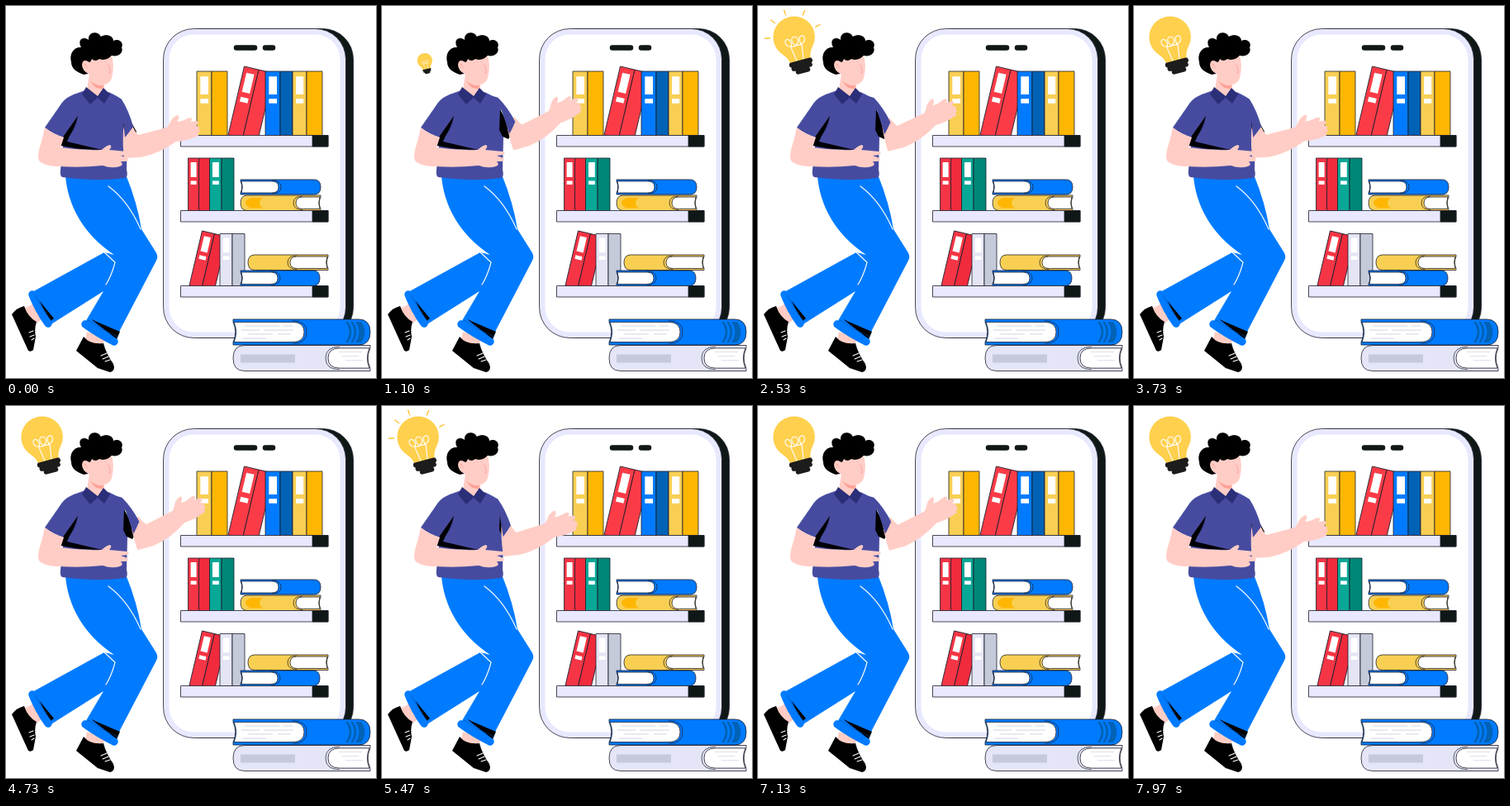
An HTML page for the animation above (8010 ms loop, 448 by 450 pixels).

```html
<!DOCTYPE html>
<html lang="en">
<head>
<meta charset="utf-8">
<title>Mobile library</title>
<style>
html, body { margin: 0; width: 100%; height: 100%; overflow: hidden; background: #fff; }
svg { display: block; width: 448px; height: 450px; }
.ink { stroke: #1d1d2b; stroke-width: .8; stroke-linejoin: round; }
.skin { fill: #ffcdc5; }
.blue { fill: #007bff; }
.shirt { fill: #464ba0; }
.line { fill: none; stroke: #fff; stroke-width: 1.1; stroke-linecap: round; }
</style>
</head>
<body>
<svg viewBox="0 0 448 450">
  <g id="phone">
    <rect class="ink" x="200" y="27.5" width="220.5" height="374" rx="37" fill="#101817"/>
    <rect class="ink" x="190.5" y="27.5" width="221" height="374" rx="37" fill="#e8e8ff"/>
    <rect x="197.5" y="34.5" width="207" height="360" rx="30" fill="#fff"/>
    <path d="M279 50.5H301M314 50.5H323" stroke="#101817" stroke-width="6.5" stroke-linecap="round"/>
  </g>
  <g id="shelves"></g>

  <g id="man">
    <path class="skin" d="M22 366L37 358 47 377 33 386ZM98 394L121 402 116 412 96 403Z"/>
    <path d="M7 373Q13 365 22 363Q26 376 37 382Q34 391 36 400L33 416Q30 419 27 417Z"/>
    <path d="M85 417L94 400Q102 410 118 408Q121 420 130 433Q133 441 126 443L111 438Z"/>
    <path class="line" d="M28 395L33 393M29 400L34 398M31 404L34 402M115 423L122 420M117 427L124 424M120 430L126 428"/>
    <path class="blue" d="M72 206C75 240 92 275 131 301L119 298 30 347 53 386 118 345 95 384 134 404 138 392 182 308Q185 303 181 297L164 270Q159 238 145 204Z"/>
    <path d="M36 358L40 356 58 378 51 383ZM103 379L138 394 134 403Z"/>
    <path d="M32 349Q39 367 51 384M96 385Q111 396 131 406" fill="none" stroke="#007bff" stroke-width="9.5" stroke-linecap="round"/>
    <path d="M36 350Q43 368 56 382M99 380Q114 391 135 400" fill="none" stroke="#0a4fae" stroke-width=".6"/>
    <path class="line" d="M124 218C139 229 153 247 163 270M118 297L132 310Q128 326 121 337"/>

    <path class="skin" d="M101 82L119 90 119 104 110 116 98 101Z"/>
    <path class="shirt" d="M96 102C82 107 72 109 65 121L47 147Q57 155 70 159L66 198Q65 205 68 207Q105 213 145 208Q148 205 146 198L147 160 144 128 140 113Q135 109 124 104L111 110Z"/>
    <path d="M87 133Q85 145 76 159L74 164 116 174 90 173 66 169 70 157Z"/>
    <path d="M143 125L158 152 153 161 146 158 142 150Z"/>
    <path d="M97 98L92 107 102 119 111 111 119 118 126 107 118 99 111 109Z" fill="#2b2f78"/>
    <path d="M102 90Q108 97 118 96L117 100Q107 101 102 90Z" fill="#ff9f96"/>

    <path d="M94 83C86 80 79 76 79 68C76 57 83 49 91 50C86 41 93 36 100 41C99 32 110 29 115 37C121 33 130 36 130 42C138 38 143 46 140 50C143 57 135 62 128 60L110 80Z"/>
    <path class="skin" d="M104 64Q108 68 113 64Q121 67 128 60Q131 70 129 82Q128 94 119 95Q108 94 101 83Q92 78 92 71Q93 63 101 68Q103 67 104 64Z"/>
    <path d="M123 71Q128 77 125 82M94 70Q97 70 98 75" fill="none" stroke="#ff9f96" stroke-width="1"/>

    <path id="arm" class="skin" d="M143 145L153 145Q156 152 160 156L195 147Q198 143 200 138Q204 133 208 132Q211 134 207 140L213 139 222 135Q228 136 223 140L231 139Q235 142 229 145Q237 146 233 149Q237 152 232 154Q235 157 230 158Q220 163 206 164Q185 179 163 183L143 184Q141 170 142 150Z"/>
    <path id="sleeve" class="shirt" d="M127 106L140 113Q149 127 154 146Q149 153 144 159L141 130Z"/>
    <path class="skin" d="M47 147Q57 155 70 159L66 171Q91 175 116 174Q121 169 126 168Q129 170 125 174L146 176Q151 178 147 180L139 181 147 184Q149 187 145 188L139 188Q143 192 138 194Q128 197 117 193Q88 196 65 194Q46 194 40 187Q37 180 43 164Z"/>
  </g>

  <g id="bulb">
    <path d="M0-71A25 25 0 0 1 19-29.5Q13-23 12.500-15H-12.500Q-13-23-19-29.500A25 25 0 0 1 0-71Z" fill="#ffd04e"/>
    <path class="line" d="M-4-16L-7-36C-14-38-13-47-8-45C-4-43-5-36-7-36Q0-34 0-36C-5-38-5-47 0-46C5-47 5-38 0-36Q5-34 7-36C5-36 4-43 8-45C13-47 14-38 7-36L4-16"/>
    <path d="M-11.500-14H11.500M-10-9H10M-6-4H6" stroke="#1c1c1c" stroke-width="6" stroke-linecap="round"/>
  </g>
  <g id="rays" stroke="#ffc234" stroke-width="1.4" stroke-linecap="round"></g>
</svg>
<script>
const $ = id => document.getElementById(id);
const rect = (x, y, w, h, fill) =>
  `<rect class="ink" x="${x}" y="${y}" width="${w}" height="${h}" fill="${fill}"/>`;

const shelf = y => rect(211.500, y, 178.500, 13.500, '#e8e8ff') + rect(371, y, 19, 13.500, '#101817');

// Standing book: spine with two labels, then the cover; lean tips it to the right.
function standing(x, base, h, a, b, spine, cover, lean = 0) {
  const w = a * .54, lx = a * .24;
  return `<g transform="translate(${x} ${base}) matrix(1 ${lean} ${-lean} 1 0 0)">` +
    rect(0, -h, a, h, spine) + rect(a, -h, b, h, cover) +
    `<path d="M${lx} ${h * -.92}h${w}v${h * .28}h${-w}zM${lx} ${h * -.57}h${w}v${h * .07}h${-w}z" fill="#fff"/></g>`;
}

// Lying book with its page edges on the left, or on the right when flipped.
function lying(x, y, w, h, pages, fill, flip, extra = '') {
  const r = h * .45, m = h * .11, e = pages - r;
  return `<g transform="translate(${flip ? x + w : x} ${y}) scale(${flip ? -1 : 1} 1)">
    <path class="ink" fill="${fill}" d="M0 0H${w - r}Q${w} 0 ${w} ${h / 2}T${w - r} ${h}H0V${h - m}Q${h * .18} ${h / 2} 0 ${m}Z"/>
    <path class="ink" fill="#fff" d="M1 ${m}H${e}Q${pages} ${m} ${pages} ${h / 2}T${e} ${h - m}H1Q${h * .2} ${h / 2} 1 ${m}Z"/>
    <path d="M${e} ${m / 2}Q${pages + 3} ${m / 2} ${pages + 3} ${h / 2}T${e} ${h - m / 2}" fill="none" stroke="#1d1d2b" stroke-width=".7"/>
    ${extra}</g>`;
}

const red = '#f53545', darkRed = '#f02b3c', coral = '#fb3c47', yellow = '#f9cf53', amber = '#ffb703',
      blue = '#007bff', navy = '#0062b5', pale = '#e3e5f5', grey = '#c5cadb';
const blob = `<path d="M85 3Q97 9 85 15.500H70Q78 9 70 3Z" fill="${amber}"/>`;
const arc = (x, w) => `M${x} 3Q${x + 9} 15 ${x} 28H${x + w}Q${x + w + 9} 15 ${x + w} 3Z`;
const pageLines = '<path d="M14 8H56M61 8H72M10 13H32M37 13H73M18 18H48M54 18H70M12 23H40" stroke="#c5cadb" stroke-width=".8"/>';

$('shelves').innerHTML =
  standing(231, 156.500, 77.500, 18, 19, yellow, amber) +
  standing(269, 156, 83, 17.500, 18, coral, coral, .235) +
  standing(314, 156.500, 77.500, 18, 15, blue, navy) +
  standing(347, 156.500, 77.500, 17, 19, yellow, amber) +
  shelf(156.500) +
  standing(220.500, 248, 64, 13, 13, red, darkRed) +
  standing(246.500, 248, 64, 14.500, 15, '#08a896', '#008777') +
  lying(284, 210, 97, 18, 46, blue) +
  lying(284, 229, 97, 18.500, 30, yellow, true, blob) +
  shelf(247.500) +
  standing(222, 338, 66, 15, 15, red, darkRed, .235) +
  standing(259, 338.500, 63, 15, 15, pale, grey) +
  lying(293, 301, 97, 18.500, 46, yellow, true) +
  lying(284, 320, 96, 18.500, 45, blue) +
  shelf(338.500) +
  lying(275, 410.500, 166, 31, 51, '#e4e6f8', true,
    '<path d="M91 11H157V21H91Z" fill="#c5cadb"/><path d="M10 8H38M14 13H34M9 18H30" stroke="#d5d9e6" stroke-width=".8"/>') +
  lying(275, 379, 166, 31, 86, blue, false,
    `<path d="${arc(136, 3)}${arc(142, 3)}${arc(148, 7)}" fill="${navy}"/>` + pageLines);

$('rays').innerHTML = [178, 217, 250, 292, 334].map(a =>
  `<path d="M29 0H35" transform="translate(43.5 38) rotate(${a})" pathLength="1" stroke-dasharray="1"/>`).join('');

const LOOP = 8010, SWING = LOOP / 4;
const clamp = v => Math.max(0, Math.min(1, v));
const smooth = v => (v = clamp(v), v * v * (3 - 2 * v));
// Quick start, long settling end.
const settle = u => u * u / (u * u + .45 * (1 - u) ** 3);

function draw(now) {
  const t = now % LOOP;

  const half = (t % SWING) / SWING * 2;
  const lift = half < 1 ? settle(half) : 1 - settle(half - 1);
  $('arm').setAttribute('transform', `rotate(${-13 * lift} 108 106)`);
  $('sleeve').setAttribute('transform', `rotate(${-13 * lift} 130 110)`);

  const over = smooth((t - 900) / 530), back = smooth((t - 1430) / 220);
  const size = 1.11 * over - .11 * back;
  const tilt = -15 + 6 * over * (1 - back);
  $('bulb').setAttribute('transform', `translate(55.5 82) rotate(${tilt}) scale(${size})`);

  const flash = t % 1000;
  const on = t > 1700 && flash > 340 && flash < 680;
  $('rays').style.display = on ? '' : 'none';
  $('rays').style.strokeDashoffset = 1 - clamp((flash - 340) / 120);

  requestAnimationFrame(draw);
}
draw(performance.now());
</script>
</body>
</html>
```
